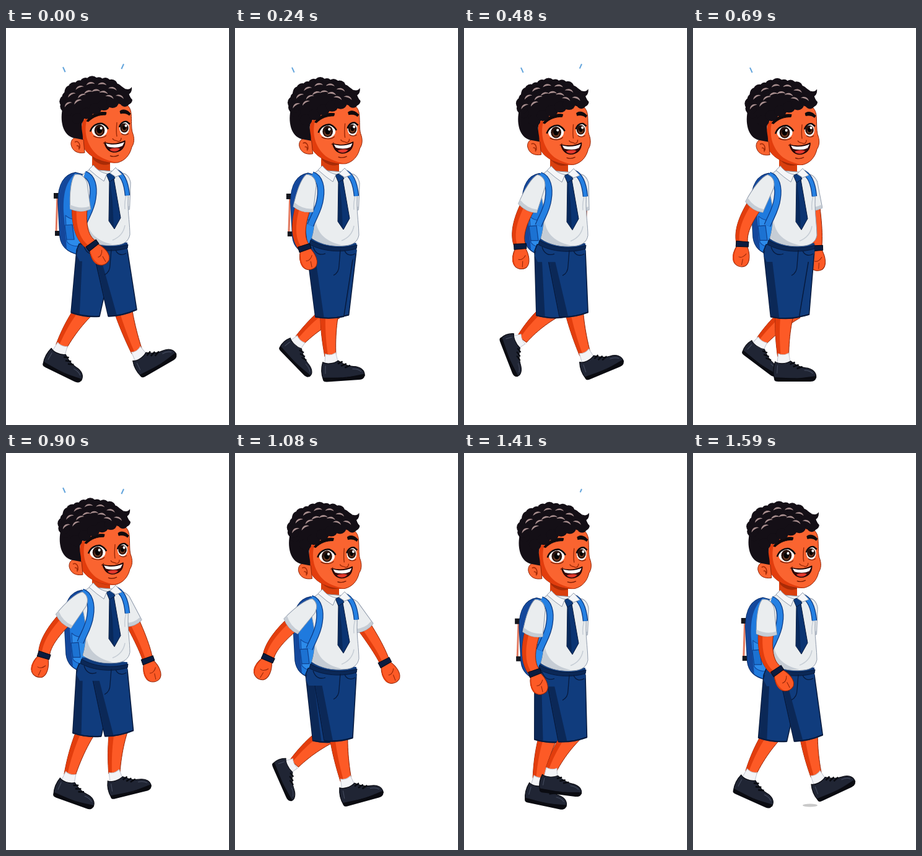
Animation, 360 px wide and 640 px high, one loop 1620 ms. Source, as an HTML page with a canvas:

```html
<!DOCTYPE html>
<html lang="en">
<head>
<meta charset="utf-8">
<title>Walking schoolboy</title>
<style>
  html, body { margin: 0; width: 100%; height: 100%; overflow: hidden; background: #fff; }
  canvas { display: block; width: 360px; height: 640px; }
</style>
</head>
<body>
<canvas id="stage" width="360" height="640"></canvas>
<script>
const g = document.getElementById('stage').getContext('2d');
const LOOP = 1620, TICK = 30, RAD = Math.PI / 180;
const SKIN = '#fd5a26', SKIN_DARK = '#e23d0d', SKIN_LINE = '#8f2408', FACE = '#fa6430';
const NAVY = '#103c7d', NAVY_DARK = '#0b2857', INK = '#071a3d';
const BLUE = '#1f7ade', BLUE_DARK = '#14479b';
const SHIRT = '#eaedef', SHIRT_DARK = '#c6cdd5', SHIRT_LINE = '#8f9aab';
const HAIR = '#140f16';

// Three walking steps: length in ms, easing power.
const STEPS = [[430, 1.3], [540, .85], [650, .75]];

function walk(t) {
  let i = 0;
  while (t >= STEPS[i][0]) t -= STEPS[i++][0];
  return i + (t / STEPS[i][0]) ** STEPS[i][1];
}
const mix = (a, b, u) => a + (b - a) * u;
const arc = t => Math.sin(Math.PI * t / LOOP);
const bump = (t, mid, width) => Math.exp(-(((t - mid) / width) ** 2));
const torsoY = t => 2 * arc(t) - 14 * bump(t, 920, 130);
const armSwing = t => 16 - 32 * arc(t) - 20 * bump(t, 1050, 190);

function path(d, fill, line, width = 1) {
  const p = new Path2D(d);
  if (fill) { g.fillStyle = fill; g.fill(p); }
  if (line) { g.strokeStyle = line; g.lineWidth = width; g.stroke(p); }
}
function oval(x, y, rx, ry, fill) {
  g.beginPath();
  g.ellipse(x, y, rx, ry, 0, 0, 7);
  g.fillStyle = fill;
  g.fill();
}
function placed(x, y, turn, draw, sy = 1) {
  g.save();
  g.translate(x, y);
  g.rotate(turn);
  g.scale(1, sy);
  draw();
  g.restore();
}
const polygon = points => 'M' + points.map(p => p.join(' ')).join('L') + 'Z';

// Tapered limb that bends through b, with a shaded side.
function limb(a, b, c, w0, w1) {
  const n = 12, k = [0, 1].map(i => 2 * b[i] - (a[i] + c[i]) / 2);
  const edges = [[], [], []];
  for (let i = 0; i <= n; i++) {
    const u = i / n, v = 1 - u, w = mix(w0, w1, u) / 2;
    const [x, y] = [0, 1].map(j => v * v * a[j] + 2 * u * v * k[j] + u * u * c[j]);
    const [dx, dy] = [0, 1].map(j => v * (k[j] - a[j]) + u * (c[j] - k[j]));
    const len = Math.hypot(dx, dy) || 1;
    [-1, 1, .42].forEach((s, e) => edges[e].push([x - dy / len * w * s, y + dx / len * w * s]));
  }
  const [right, left, shade] = edges;
  path(polygon([...right, ...left.reverse()]), SKIN, SKIN_LINE);
  path(polygon([...shade, ...left]), SKIN_DARK);
}

// Arm hanging from a shoulder; angles in degrees from straight down.
function arm(x, y, upper, fore, width) {
  const along = (p, deg, len) => [p[0] + len * Math.sin(deg * RAD), p[1] + len * Math.cos(deg * RAD)];
  const top = [x, y], elbow = along(top, upper, 74);
  const wrist = along(elbow, fore, 30), hand = along(elbow, fore, 50);
  limb(along(top, upper, 30), elbow, wrist, width, width - 7);
  placed(...hand, (90 - fore) * RAD, () => {
    path('M-17 -8C-6 -14 9 -16 15 -8C19 0 16 9 8 12C-2 15 -10 12 -17 8Z', SKIN, SKIN_LINE);
    path('M-14 8C-4 13 6 12 13 8C8 16 -4 15 -14 8Z', SKIN_DARK);
    path('M4 -3L14 -2M-5 -8C0 -5 3 0 1 4', null, SKIN_LINE);
  });
  placed(...wrist, (90 - fore) * RAD, () => path('M-4 -10L4 -10L5 10L-4 10Z', '#0a1c40', '#050b18'));
  placed(x, y, -upper * RAD, () => {
    const w = width * .66;
    path(`M-6 -16C-13 -8 ${-w} 14 ${-w} 39Q0 47 ${w} 41L13 -2Q8 -18 -6 -16Z`, SHIRT, SHIRT_LINE);
    path(`M${-w} 39Q0 47 ${w} 41L${w - 1} 36Q0 41 ${-w} 32Z`, SHIRT_DARK);
  });
}

function foot(x, y, deg, depth) {
  placed(x, y, deg * RAD, () => {
    path('M-8 -13C-2 -10 4 -11 9 -14L12 4L-10 4Z', '#f3f4f7', '#c3c7d0');
    path('M-13 0C-8 4 4 4 12 -1C18 4 26 9 36 10C47 11 54 17 53 26L-14 28C-17 18 -16 8 -13 0Z', '#202534', '#0a0b12', 1.2);
    path('M-14 25L22 27L53 23C54 29 50 32 44 32L-8 32C-15 32 -15 29 -14 25Z', '#0a0b11');
    path('M11 4L19 1M16 8L25 5M22 11L31 8', null, '#080a10', 2.6);
    path('M34 14C40 14 45 16 48 19M-9 6L-10 19', null, '#41485b', 1.2);
  }, depth);
}

// Phase 0 to 1 is the foot on the ground, 1 to 2 the swing forward.
function leg(phase, dy) {
  const u = phase % 1, swing = phase % 2 >= 1;
  const lift = swing ? Math.sin(Math.PI * Math.sqrt(u)) : 0;
  const c = 2 * u - 1;
  const x = mix(85, 216, swing ? u ** 3 : 1 - u);
  const y = swing ? mix(522, 530, u) - 20 * lift : 538 - c * c * (c < 0 ? 8 : 16);
  const deg = mix(26, -30, swing ? u : 1 - u) + 55 * lift;
  const hem = mix(128, 188, swing ? u ** .8 : (1 - u) ** 1.4);
  const low = 465 - Math.abs(hem - 150) * .15 + dy, tilt = (hem - 150) * .14;

  const end = [x + 9 * Math.sin(deg * RAD), y - 9 * Math.cos(deg * RAD)];
  limb([hem, low - 9], [(hem + end[0]) / 2 - 2, (low + end[1]) / 2 - 6], end, 30, 18);
  foot(x, y, deg, 1 - .22 * lift);

  const top = 358 + dy;
  const hipL = 114 + .7 * Math.max(0, hem - 150), hipR = 196 - .7 * Math.max(0, 158 - hem);
  const lx = hem - 23, ly = low + tilt, rx = hem + 23, ry = low - tilt;
  const bottom = `Q${hem} ${low + 5} ${rx} ${ry}`;
  path(`M${hipL + 4} ${top - 10}L${hipL} ${top}L${lx} ${ly}${bottom}L${hipR} ${top}L${hipR - 3} ${top - 10}Z`, NAVY, INK, 1.5);
  path(polygon([[hipL + 1, top], [lx + 1, ly], [mix(lx, rx, .3), mix(ly, ry, .3) + 1], [mix(hipL, hipR, .16), top]]), NAVY_DARK);
  path(`M${lx} ${ly}${bottom}`, null, INK, 2.2);
}

function legs(t, dy) {
  const p = walk(t), front = Math.floor(p + .4) % 2;
  leg(p + 1 - front, dy);
  leg(p + front, dy);
}

function waist() {
  path('M123 338C120 348 117 356 114 366L119 376L188 376L196 362L196 346Z', NAVY);
  path('M122 341C142 354 174 356 197 349L196 355C172 362 142 360 120 348Z', NAVY_DARK, INK);
  path('M170 357L168 382C168 392 163 396 159 398M126 352C130 364 138 366 146 363M177 358C180 366 188 367 194 363', null, INK, 1.3);
}

function pack(x, y) {
  placed(x, y, 0, () => {
    if (x < 6) {
      path('M83 268L81 330', null, '#e2795f', 3);
      path('M77 266h9v9h-9ZM79 327h8v8h-8Z', '#15171f');
    }
    path('M112 233C94 236 84 252 84 280L87 336C89 352 98 361 116 365L138 352L138 240Z', BLUE, '#0b2f70', 1.5);
    path('M112 234C95 236 85 252 85 280L88 337C90 347 93 352 98 356L93 296C92 266 97 248 112 234Z', BLUE_DARK);
    path('M96 302C103 309 114 310 126 306L124 350C112 354 102 350 98 344Z', '#2c8bea', '#124a9f', 1.2);
    path('M95 318L107 317L110 341L98 341Z', '#1c72d2', '#0f4290', 1.2);
  });
}

function strap(d, width) {
  path(d, null, '#0d3a83', width + 2.5);
  path(d, null, '#2580e2', width);
}

function torso(strapX) {
  path('M139 205L139 228L153 238L168 234L168 210Z', '#d93f0e');
  path('M141 212C150 221 160 222 168 219L168 210L139 206Z', '#a92b06');
  path('M135 228L186 232C195 244 198 262 197 282C197 300 200 318 200 333C198 344 190 349 178 350C158 352 138 348 124 338C130 318 130 298 127 280C124 262 119 250 124 236Z', SHIRT, SHIRT_LINE);
  path('M125 337C128 328 130 318 130 308C132 326 142 342 172 349C152 351 136 346 125 337Z', SHIRT_DARK);
  path('M192 318C190 330 182 338 172 342M195 266C192 276 191 284 192 292', null, SHIRT_DARK, 1.5);
  strap('M177 231C188 235 194 248 196 270', 6);
  placed(strapX, 0, 0, () => strap('M127 236C139 240 143 256 140 274C138 291 130 302 124 317', 9));
  path('M167 244L174 243L185 306L175 324L166 311Z', '#0b3472', INK);
  path('M162 236L171 233L176 242L167 248Z', '#0d3c80', INK);
  path('M168 247L167 310L174 322L172 280Z', '#08285a');
  path('M134 228L141 221C147 229 154 233 163 235L158 247L147 239Z', '#f5f6f8', SHIRT_LINE);
  path('M168 234L177 225L187 236L177 240Z', '#f5f6f8', SHIRT_LINE);
}

function hair() {
  path('M203 116C196 100 186 88 160 84C130 78 100 100 92 126C86 150 92 172 108 177L124 180C125 168 118 158 126 146C130 136 138 131 152 126C166 124 172 118 182 122C190 125 200 124 203 116Z', HAIR);
  // Curls along the rim, then loose tufts
  for (let i = 0; i < 16; i++) {
    const a = (160 + i * 13) * RAD;
    oval(144 + 48 * Math.cos(a), 122 + 35 * Math.sin(a), 8 + i % 3, 8 + i % 3, HAIR);
  }
  for (let i = 0; i < 5; i++) oval(116 + i * 14, 146 - 28 * Math.sin(i / 5 * 1.5), 10, 9, HAIR);
  path('M192 98C198 100 201 98 203 95C204 103 200 107 195 108ZM194 110C199 113 202 112 204 116C203 124 194 126 188 120ZM96 103C94 99 97 94 101 93L106 101Z', HAIR);
  // Two arcs of highlights
  for (let i = 0; i < 13; i++) {
    const a = (185 + i * 12.5) * RAD, r = i % 2 ? .62 : .92;
    placed(144 + 48 * r * Math.cos(a), 126 + 40 * r * Math.sin(a), Math.cos(a) * .5, () =>
      path('M-7 2C-4 -4 4 -4 7 1C3 -1 -3 0 -7 2Z', '#a98f8f'));
  }
}

function eye(x, y, rx, iris) {
  oval(x, y, rx, 10.5, '#fff');
  oval(x, y, iris, iris + .8, '#2a130d');
  oval(x, y + 2, iris - 3, iris - 3.2, '#6e3a22');
  oval(x, y, iris - 4, iris - 3.4, '#050304');
  oval(x + 2.6, y - 3.6, 2, 2.2, '#fff');
}

function head() {
  path('M124 150C124 135 150 122 172 119C190 117 201 124 202 138C203 150 202 160 204 168C208 178 207 186 203 192C200 205 192 214 180 217C164 218 148 213 138 206C126 198 121 186 121 172Z', FACE, SKIN_LINE);
  path('M123 152L132 142C124 166 130 190 148 205C160 213 170 215 180 217C164 218 148 213 138 206C126 198 121 186 121 172Z', SKIN_DARK);
  path('M125 180C115 172 104 177 105 188C107 198 115 203 127 201Z', FACE, SKIN_LINE);
  path('M111 184C116 181 120 186 119 194M114 190C118 189 118 192 118 196', null, '#a12a08', 1.5);
  eye(151, 165, 12.5, 8.4);
  eye(191, 161, 8, 6.8);
  path('M136 167C139 157 148 153 155 154C160 156 163 159 165 163M183 160C185 153 190 150 195 151L200 155', null, '#100a0c', 2.6);
  path('M141 174C147 178 158 178 162 173M186 170C190 173 195 173 198 170', null, '#6a1d0a', 1.1);
  path('M130 150C137 139 150 134 162 136L161 140C150 140 141 143 133 151ZM184 134C189 130 196 132 201 138L199 141C195 137 189 137 185 138Z', '#100a0c', '#100a0c');
  path('M179 152C178 162 178 170 179 175M172 178C174 183 178 180 181 183C184 183 186 181 186 177', null, '#9c2a08', 1.4);
  placed(-2, -2, 0, () => {
    path('M161 187C172 190 184 189 194 184C194 194 188 202 176 202C168 201 163 195 161 187Z', '#3a0a0b', '#1c0606', 1.4);
    path('M163 188C173 191 184 190 193 186L190 192C182 196 172 195 166 193Z', '#fff');
    path('M169 198C174 195 182 195 186 197C182 202 174 203 169 198Z', '#e2382c');
    path('M159 188L163 185M170 208C175 210 180 209 184 207', null, '#7d1f08', 1.4);
  });
  hair();
}

function mark(x, y, len, lean) {
  if (len > 1) path(`M${x} ${y}l${lean * len} ${len}`, null, '#62a4dc', 2);
}

function draw(t) {
  g.fillStyle = '#fff';
  g.fillRect(0, 0, 360, 640);
  g.lineJoin = 'round';
  const dy = torsoY(t), swing = armSwing(t), back = Math.min(10, 13 * arc(t));
  const far = Math.max(-8, -1.6 * swing - 20);
  if (t >= 1530) oval(189, 568, 12, 2.6, '#c9c9c9');
  arm(188, 250 + dy, far + 3, far - 3, 23);
  pack(back, dy);
  legs(t, dy * .7);
  placed(0, dy * .75, 0, waist);
  placed(0, dy, 0, () => torso(-.4 * back));
  arm(118, 252 + dy, swing - 13, 15 + 1.3 * swing, 25);
  placed(-3 * arc(t), 4 * arc(t) - 9 * bump(t, 920, 130), 0, head);
  mark(92, 63 + dy * .6, t < 1000 ? 8 : 0, .45);
  mark(190, 58, 8 * Math.cos(Math.PI * t / 225), -.45);
}

const start = performance.now();
function tick(now) {
  const ms = Math.max(0, now - start) % LOOP;
  draw(Math.floor(ms / TICK) * TICK);
  requestAnimationFrame(tick);
}
draw(0);
requestAnimationFrame(tick);
</script>
</body>
</html>
```
